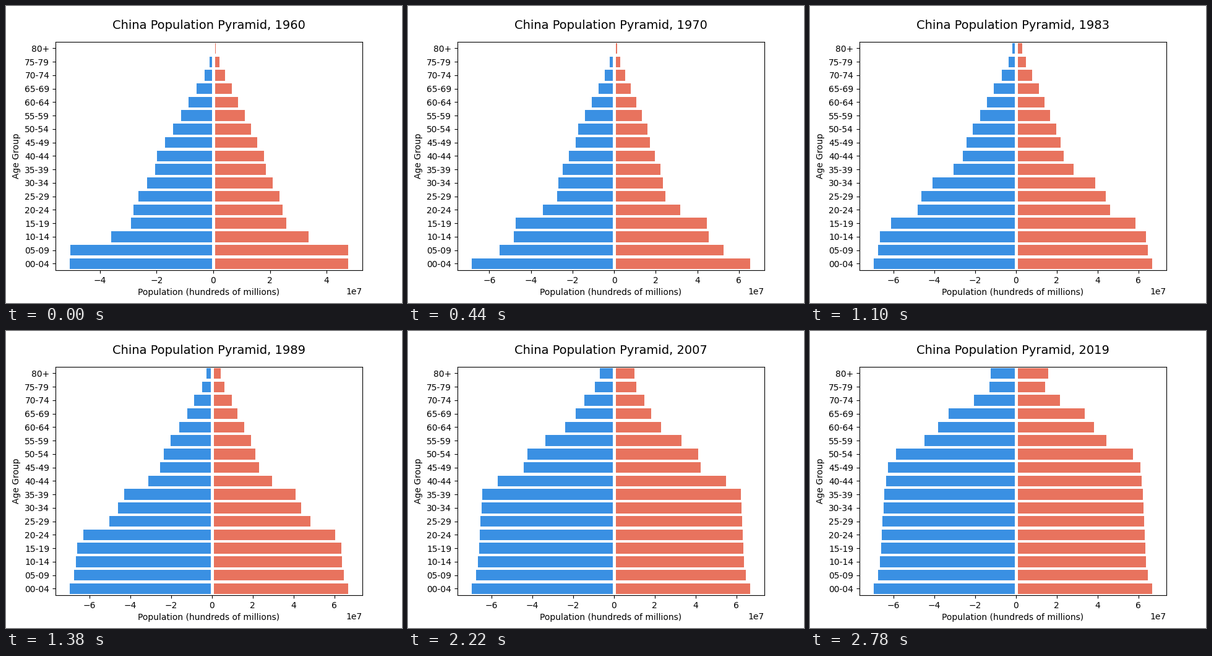
A matplotlib script for the animation above (2880 ms loop, 640x480 px).

```python
import numpy as np
import matplotlib.pyplot as plt
from matplotlib.animation import FuncAnimation

START, END = 1960, 2019
YEARS = np.arange(START, END + 1)
GROUPS = [f"{a:02d}-{a + 4:02d}" for a in range(0, 80, 5)] + ["80+"]

# Five-year cohorts, in millions, when first counted: in 1960 or at birth.
BORN = [1875, 1880, 1885, 1890, 1920, 1925, 1935, 1940, 1945, 1950, 1955,
        1960, 1962, 1964, 1967, 1969, 1971, 1980, 1990, 2000]
MEN = [0, 0.3, 1.2, 3.0, 19.8, 20.4, 26.3, 28.1, 28.9, 35.9, 50.3,
       50.7, 49.5, 54.2, 62.8, 67.2, 69.9, 56, 68.5, 50]
WOMEN = [0, 0.9, 2.2, 4.2, 17.9, 18.6, 23.4, 24.5, 25.8, 33.6, 47.6,
         47.7, 47.3, 51.8, 60.0, 64.2, 66.9, 53, 62, 45]


def cohort_size(born, year, sizes, frailty):
    """Cohort left in a year: old-age, childhood and famine deaths."""
    age = year - born
    first = np.maximum(START - born, 0)
    era = np.exp(-0.02 * (born - 1965))
    old = frailty * (np.exp(0.07 * age) - np.exp(0.07 * first))
    child = 0.063 * (np.exp(-first / 6) - np.exp(-age / 6))
    famine = 0.035 * (born < START) * (1 - np.exp((START - year) / 4))
    return np.interp(born, BORN, sizes) * np.exp(-era * (old + child) - famine)


def records(sizes, frailty):
    """Largest size each age group has reached by each year."""
    ages = np.arange(0, 90, 5)
    year = YEARS[:, None]
    groups = cohort_size(year - ages, year, sizes, frailty)
    groups[:, -2] += groups[:, -1]  # 80-84 and 85-89 make up 80+
    return np.maximum.accumulate(groups[:, :-1]) * 1e6


male, female = records(MEN, 0.0026), records(WOMEN, 0.0019)

# Every third year is held for five ticks, and so is the last one.
TICK = 20
holds = [5 if i % 3 == 1 or i == END - START else 1 for i in range(len(YEARS))]
order = np.repeat(np.arange(len(YEARS)), holds)

fig, ax = plt.subplots(figsize=(6.4, 4.8), dpi=100)
rows = np.arange(len(GROUPS))
left = ax.barh(rows, -male[0], height=0.8, color="#3a90e3")
right = ax.barh(rows, female[0], height=0.8, color="#e8735e")
ax.axvline(0, color="white", lw=3.6)
ax.set_ylim(-0.5, len(GROUPS) - 0.5)
ax.set_yticks(rows, GROUPS)
ax.set_xlabel("Population (hundreds of millions)")
ax.set_ylabel("Age Group")
title = ax.set_title("", fontsize=14, pad=15)


def update(tick):
    i = order[tick]
    for bar, m in zip(left, male[i]):
        bar.set_width(-m)
    for bar, f in zip(right, female[i]):
        bar.set_width(f)
    lo, hi = -male[i].max(), female[i].max()
    margin = 0.05 * (hi - lo)
    ax.set_xlim(lo - margin, hi + margin)
    title.set_text(f"China Population Pyramid, {YEARS[i]}")
    return [*left, *right, title]


anim = FuncAnimation(fig, update, frames=len(order), interval=TICK, repeat=True)
plt.show()
```
